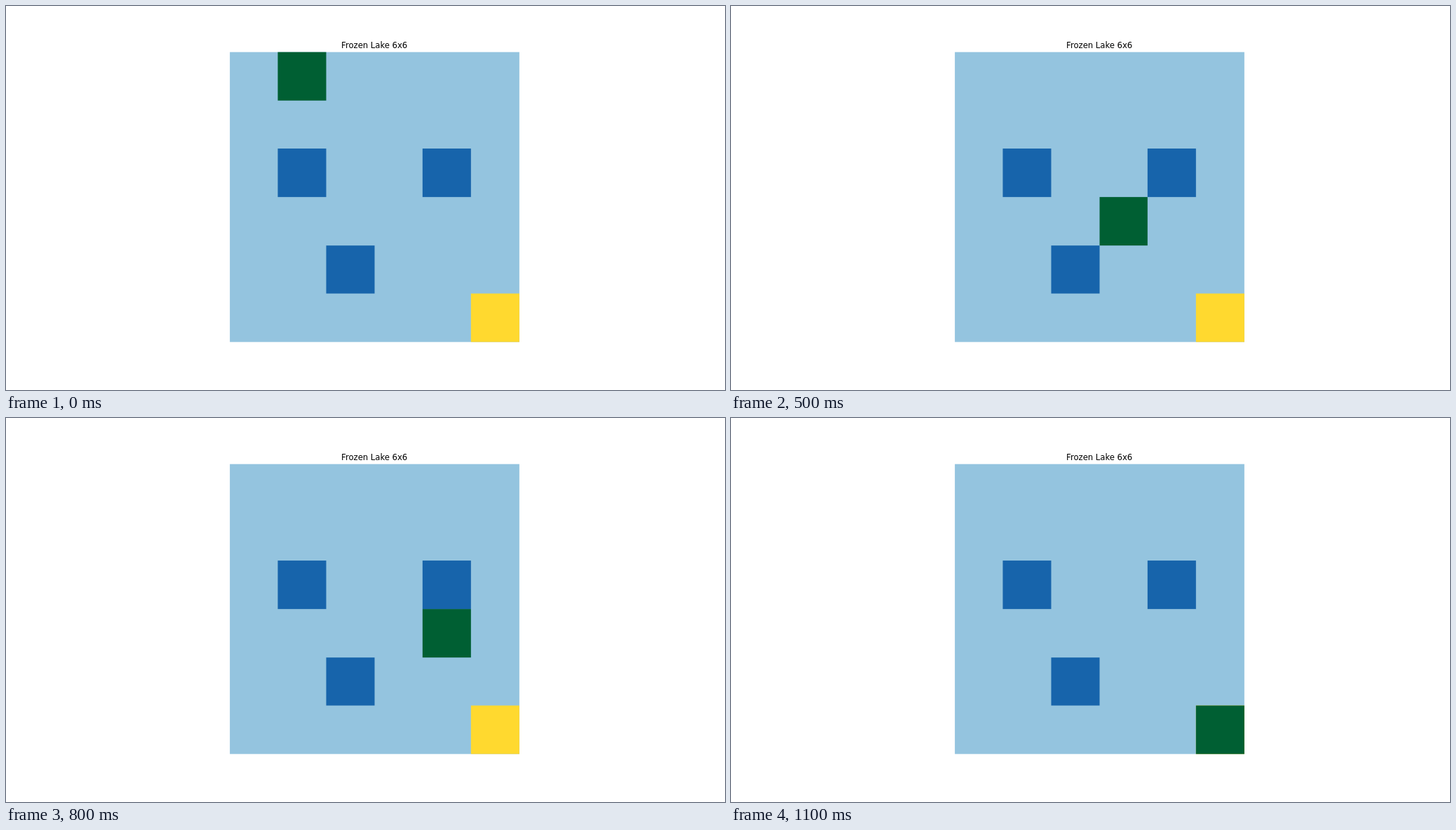
These frames come from a looping animation (1025 px wide and 547 px high, 1.2 s). An HTML page:

```html
<!DOCTYPE html>
<html lang="en">
<head>
<meta charset="utf-8">
<title>Frozen Lake 6x6</title>
<style>
  html, body { margin: 0; width: 100%; height: 100%; overflow: hidden; background: #fff; }
  svg { display: block; width: 1025px; height: 547px; }
  text { font: 17px "DejaVu Sans", sans-serif; text-anchor: middle; }
</style>
</head>
<body>
<svg viewBox="0 0 1500 800" preserveAspectRatio="none">
  <text x="768.5" y="88">Frozen Lake 6x6</text>
</svg>
<script>
const STEP_MS = 100;
const SIZE = 6;
const BOARD = { x: 466.75, y: 96, side: 604 };
const COLORS = { ice: "#94c4df", hole: "#1764ab", goal: "#ffd92f", agent: "#005f33" };

// The agent's walk: right, left, down
const MOVES = "RDDRDRRLRDD";
const START = { column: 1, row: 0 };

const svg = document.querySelector("svg");

// Cell edges fall on whole units of the figure
const edge = (origin, index) => Math.round(origin + index * BOARD.side / SIZE);

function place(rect, column, row, span = 1) {
  const x = edge(BOARD.x, column);
  const y = edge(BOARD.y, row);
  rect.setAttribute("x", x);
  rect.setAttribute("y", y);
  rect.setAttribute("width", edge(BOARD.x, column + span) - x);
  rect.setAttribute("height", edge(BOARD.y, row + span) - y);
}

function addRect(fill, column, row, span) {
  const rect = document.createElementNS(svg.namespaceURI, "rect");
  rect.setAttribute("fill", fill);
  place(rect, column, row, span);
  return svg.appendChild(rect);
}

addRect(COLORS.ice, 0, 0, SIZE);
addRect(COLORS.hole, 1, 2);
addRect(COLORS.hole, 4, 2);
addRect(COLORS.hole, 2, 4);
addRect(COLORS.goal, SIZE - 1, SIZE - 1);
const agent = addRect(COLORS.agent, START.column, START.row);

const startTime = performance.now();

function draw() {
  const step = Math.floor((performance.now() - startTime) / STEP_MS) % (MOVES.length + 1);
  let { column, row } = START;
  for (const move of MOVES.slice(0, step)) {
    if (move === "R") column++;
    if (move === "L") column--;
    if (move === "D") row++;
  }
  place(agent, column, row);
  requestAnimationFrame(draw);
}
draw();
</script>
</body>
</html>
```
